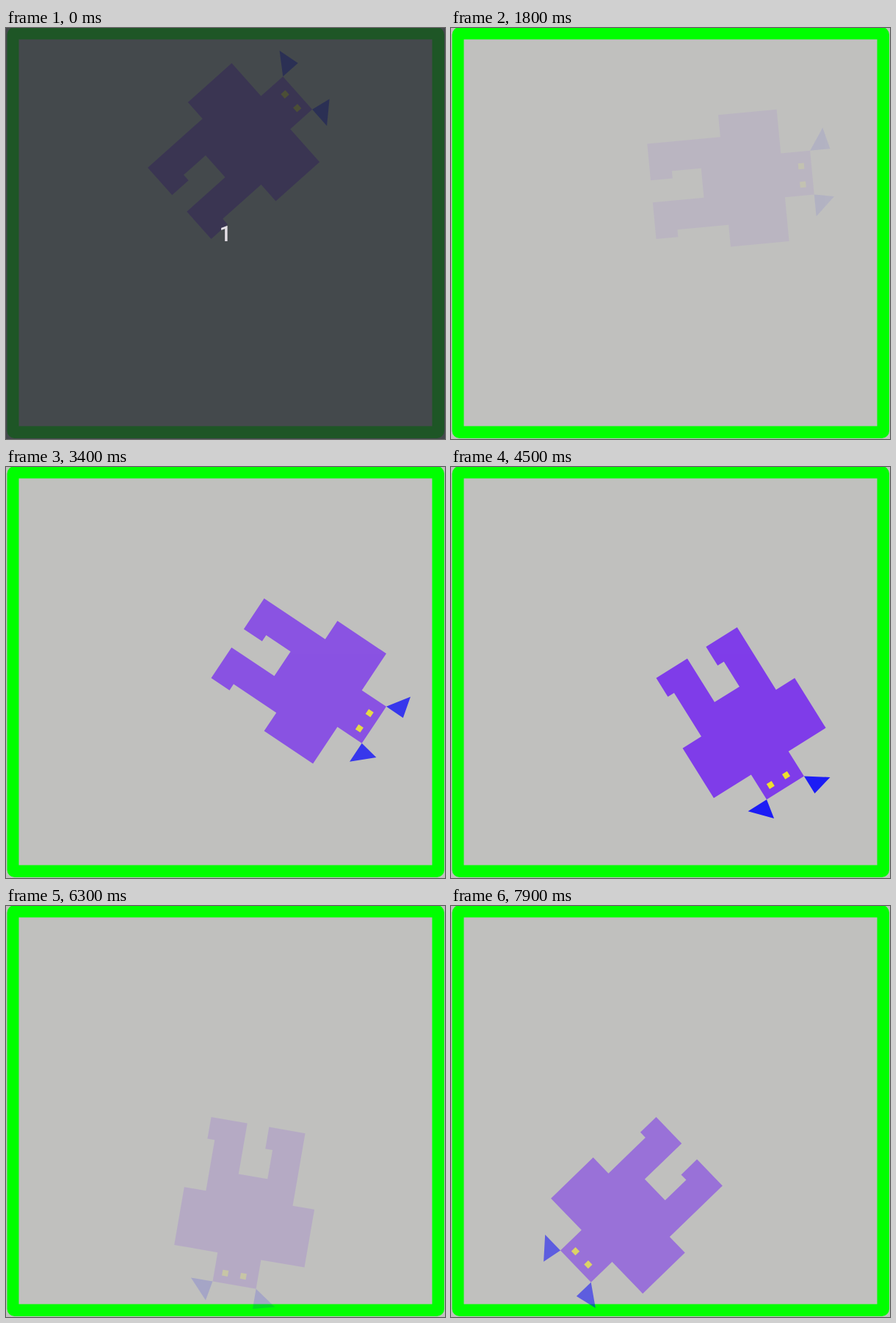
An HTML page for the animation above (8 s loop, 598 by 559 pixels).

```html
<!DOCTYPE html>
<html>
<head>
<meta charset="utf-8">
<style>
  html, body { margin: 0; width: 100%; height: 100%; overflow: hidden; background: #c0c0be; }
  svg { display: block; }
  text { font: 500 29px Roboto, Arial, sans-serif; }
</style>
</head>
<body>
<svg width="598" height="559" viewBox="0 0 598 559">
  <path fill="#0f0" fill-rule="evenodd" d="M11.5-1H587a10 10 0 0 1 10 10V548a10 10 0 0 1-10 10H11.5a10 10 0 0 1-10-10V9a10 10 0 0 1 10-10Z M17.5 15.5V541.5H580.5V15.5Z"/>
  <!-- Lies on its side, head towards +x, turning about a foot corner -->
  <g id="figure">
    <path fill="rgb(116,38,241)" d="M0 0H30V-10H100V20H180V-40H220V-100H180V-160H100V-130H0V-80H30V-90H70V-50H0Z"/>
    <path fill="#00f" d="M220-40V-10L247-35Z M220-100L240-129.5L247.5-100Z"/>
    <path fill="rgb(245,230,20)" d="M202-59h8v8h-8Z M202-84h8v8h-8Z"/>
  </g>
  <g id="countdown">
    <rect width="598" height="559" fill="rgb(38,44,48)" fill-opacity=".8"/>
    <text x="299" y="290" text-anchor="middle" fill="#e4dfe6">1</text>
  </g>
</svg>
<script>
  const LOOP = 8000, STEP = 100;
  const figure = document.getElementById('figure');
  const countdown = document.getElementById('countdown');

  // [ms, degrees]: a nearly steady turn
  const turn = [[0, -41.7], [700, -28.1], [1800, -5.4], [3400, 33.7],
                [4500, 58], [6300, 99.8], [7900, 136]];

  function angleAt(t) {
    const i = Math.max(1, turn.findIndex(k => k[0] >= t));
    const [t0, a0] = turn[i - 1], [t1, a1] = turn[i];
    return a0 + (a1 - a0) * (t - t0) / (t1 - t0);
  }

  // Linear fade out and in, 2.5 s each way, empty at 1.63 s
  function opacityAt(t) {
    const phase = (t + 3370) % 5000;
    return Math.min(phase, 5000 - phase) / 2500;
  }

  function draw(now) {
    const t = Math.floor(now % LOOP / STEP) * STEP;
    figure.setAttribute('transform', `translate(279.5 287) rotate(${angleAt(t)})`);
    figure.setAttribute('opacity', opacityAt(t));
    countdown.setAttribute('visibility', t < STEP ? 'visible' : 'hidden');
  }

  const start = performance.now();
  function tick() {
    draw(performance.now() - start);
    requestAnimationFrame(tick);
  }
  tick();
</script>
</body>
</html>
```
